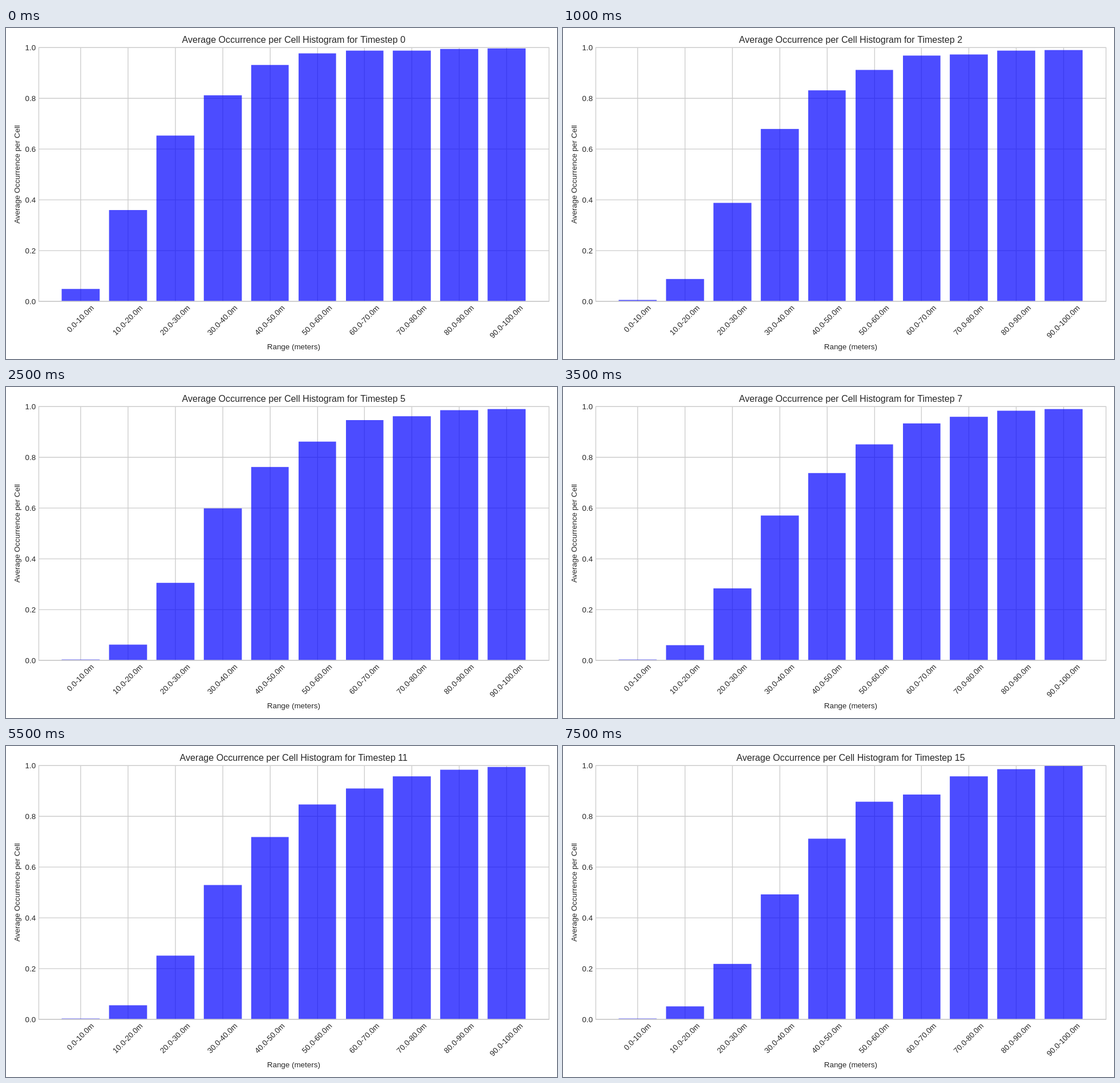
Write an HTML page with a canvas that moves like this. It is 966x580 px and loops after 8000 ms.

```html
<!DOCTYPE html>
<html lang="en">
<head>
<meta charset="utf-8">
<title>Average Occurrence per Cell</title>
<style>
html, body { margin: 0; width: 966px; height: 580px; overflow: hidden; background: #fff; }
canvas { display: block; }
</style>
</head>
<body>
<canvas id="chart" width="966" height="580"></canvas>
<script>
const ctx = document.getElementById('chart').getContext('2d');
const STEP_MS = 500, STEPS = 16;

// The figure is laid out on 1000 x 600 units and scaled to the stage.
const W = 1000, H = 600;
const LEFT = 59.1, RIGHT = 985, TOP = 35.5, BASE = 495.2;
const BARS = 10, PITCH = 85.89, FIRST_X = 135.55, BAR_W = 0.8 * PITCH;
const MID_X = (LEFT + RIGHT) / 2, MID_Y = (TOP + BASE) / 2;
const FONT = '"Liberation Sans", Arial, sans-serif';

// Each bar decays from its start to a settled level, which then drifts per step.
const START = [0.049, 0.359, 0.653, 0.812, 0.931, 0.978, 0.987, 0.989, 0.994, 0.996];
const SETTLED = [0.003, 0.0645, 0.339, 0.627, 0.717, 0.785, 0.967, 0.947, 0.978, 0.976];
const DRIFT = [0, -0.0009, -0.0081, -0.009, -0.0005, 0.0045, -0.0054, 0.0007, 0.0005, 0.0015];

function valueAt(i, step) {
  const tau = Math.min(4, 0.5 * 1.6 ** i);
  return SETTLED[i] + DRIFT[i] * step + (START[i] - SETTLED[i]) * Math.exp(-step / tau);
}

const barX = i => FIRST_X + i * PITCH;
const valueY = v => BASE - v * (BASE - TOP);
const snap = p => Math.floor(p) + 0.5;

function each(n, fn) {
  for (let i = 0; i < n; i++) fn(i);
}

function line(x1, y1, x2, y2) {
  ctx.beginPath();
  ctx.moveTo(snap(x1), snap(y1));
  ctx.lineTo(snap(x2), snap(y2));
  ctx.stroke();
}

function label(text, x, y, { size = 13.89, align = 'center', angle = 0, dy = 0 } = {}) {
  ctx.save();
  ctx.font = `${size}px ${FONT}`;
  ctx.textAlign = align;
  ctx.translate(x, y);
  ctx.rotate(angle);
  ctx.fillText(text, 0, dy);
  ctx.restore();
}

function drawGrid() {
  each(6, i => line(LEFT, valueY(i / 5), RIGHT, valueY(i / 5)));
  each(BARS, i => line(barX(i), TOP, barX(i), BASE));
}

function drawBars(step) {
  ctx.fillStyle = 'rgba(0, 0, 255, 0.7)';
  each(BARS, i => {
    const left = Math.round(barX(i) - BAR_W / 2);
    const right = Math.round(barX(i) + BAR_W / 2);
    const top = Math.round(valueY(valueAt(i, step)));
    ctx.fillRect(left, top, right - left, Math.round(BASE) - top);
  });
}

function drawFrame() {
  const x = snap(LEFT), y = snap(TOP);
  ctx.strokeRect(x, y, snap(RIGHT) - x, snap(BASE) - y);
}

function drawText(step) {
  ctx.fillStyle = '#262626';
  label(`Average Occurrence per Cell Histogram for Timestep ${step}`, MID_X, 27, { size: 16.67 });
  label('Range (meters)', MID_X, 582);
  label('Average Occurrence per Cell', 25, MID_Y, { angle: -Math.PI / 2 });
  each(6, i => label((i / 5).toFixed(1), 54, valueY(i / 5) + 5, { align: 'right' }));

  ctx.font = `13.89px ${FONT}`;
  each(BARS, i => {
    const text = `${i * 10}.0-${i * 10 + 10}.0m`;
    const half = (ctx.measureText(text).width + 13) * Math.SQRT1_2 / 2;
    label(text, barX(i), 501 + half, { angle: -Math.PI / 4, dy: 3.7 });
  });
}

function draw(step) {
  ctx.setTransform(966 / W, 0, 0, 580 / H, 0, 0);
  ctx.fillStyle = '#fff';
  ctx.fillRect(0, 0, W, H);
  ctx.strokeStyle = '#ccc';
  ctx.lineWidth = 1.39;
  drawGrid();
  drawBars(step);
  drawFrame();
  drawText(step);
}

let shown = -1;
function tick() {
  const step = Math.floor(performance.now() / STEP_MS) % STEPS;
  if (step !== shown) draw(shown = step);
  requestAnimationFrame(tick);
}
tick();
</script>
</body>
</html>
```
